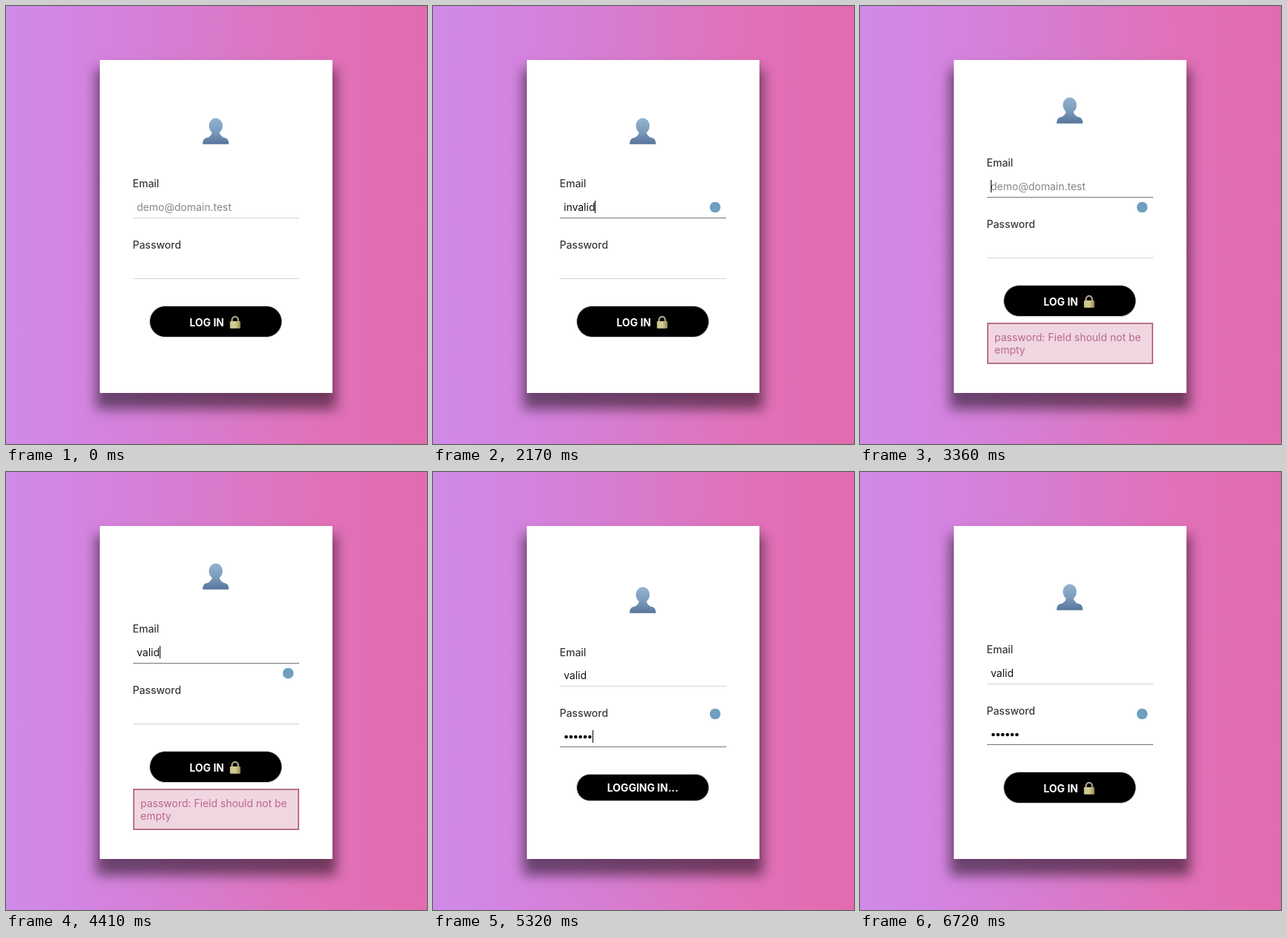
Animation of 570x592 px, one loop 6860 ms. Source, as an HTML page with a canvas:

```html
<!DOCTYPE html>
<html lang="en">
<head>
<meta charset="utf-8">
<title>Login form</title>
<style>
html, body { margin: 0; width: 100%; height: 100%; overflow: hidden; }
canvas { display: block; width: 570px; height: 592px; }
</style>
</head>
<body>
<canvas id="stage"></canvas>
<script>
const W = 570, H = 592, LOOP = 6860;
const FONT = 'Inter, Roboto, sans-serif';
const FOCUS_EMAIL = 980, REJECTED = 3010, FOCUS_PASSWORD = 4480;
const SUBMIT = 5250, DONE = 6230;
const FADE = 280;

// Times of each key press
const FIRST = [1610, 1680, 1780, 1890, 1980, 2080, 2150];
const SECOND = [3680, 3850, 3950, 4060, 4200];
const DOTS = [4620, 4710, 4800, 4890, 4980, 5070];

// Spans in which the caret is visible
const CARET_ON = [
  [FOCUS_EMAIL, 1470], [1610, 2660], [REJECTED, 3500],
  [3680, 5600], [DONE, 6720]
];

const canvas = document.getElementById('stage');
const ctx = canvas.getContext('2d');
const scale = window.devicePixelRatio || 1;
canvas.width = W * scale;
canvas.height = H * scale;

const typed = (times, t) => times.filter(k => k <= t).length;
const clamp01 = v => Math.max(0, Math.min(1, v));
const fade = (t, start) => {
  const p = clamp01((t - start) / FADE);
  return p * p * (3 - 2 * p);
};

function gradient(x0, y0, x1, y1, ...colors) {
  const g = ctx.createLinearGradient(x0, y0, x1, y1);
  colors.forEach((c, i) => g.addColorStop(i / (colors.length - 1), c));
  return g;
}

function text(str, x, y, color, weight = 400, align = 'left') {
  ctx.font = `${weight} 14px ${FONT}`;
  ctx.textAlign = align;
  ctx.fillStyle = color;
  ctx.fillText(str, x, y);
}

function rect(x, y, w, h, color) {
  ctx.fillStyle = color;
  ctx.fillRect(x, y, w, h);
}

function circle(x, y, r, color) {
  ctx.fillStyle = color;
  ctx.beginPath();
  ctx.arc(x, y, r, 0, Math.PI * 2);
  ctx.fill();
}

function background() {
  rect(0, 0, W, H, gradient(0, 0, W, 0, '#d08ae8', '#d482dd', '#d97acb', '#e171b9', '#e36bb0'));
}

function card() {
  // Only the shadow of the far-off rectangle lands on the stage
  ctx.save();
  ctx.shadowColor = 'rgba(0,0,0,0.5)';
  ctx.shadowBlur = 16 * scale;
  ctx.shadowOffsetX = 1000 * scale;
  ctx.shadowOffsetY = 17 * scale;
  rect(122 - 1000, 68, 325, 460, '#000');
  ctx.restore();
  rect(127, 73, 315, 450, '#fff');
}

function avatar(dy) {
  ctx.save();
  ctx.translate(0, dy);
  ctx.fillStyle = gradient(0, 151, 0, 187, '#93b3cf', '#7d9dbe', '#56749a');
  ctx.beginPath();
  ctx.ellipse(284, 162, 9.3, 10.6, 0, 0, Math.PI * 2);
  ctx.fill();
  ctx.fill(new Path2D('M266.3 186.8q0-6.6 4.2-8.2Q278.6 177 279.2 169H288.8Q289.4 177 297.5 178.6q4.2 1.6 4.2 8.2z'));
  ctx.restore();
}

function lock(dy) {
  ctx.save();
  ctx.translate(0, dy);
  ctx.strokeStyle = '#aaa68d';
  ctx.lineWidth = 2.2;
  ctx.stroke(new Path2D('M306 428v-3.5a4.2 4.6 0 0 1 8.4 0V428'));
  ctx.fillStyle = gradient(303, 0, 318, 0, '#cdc58a', '#d3cb95', '#8f8651');
  ctx.beginPath();
  ctx.roundRect(303.2, 426, 14.2, 9.8, 1.2);
  ctx.fill();
  ctx.restore();
}

function button(y, h) {
  ctx.beginPath();
  ctx.roundRect(194.5, y + 0.5, 179, h - 1, (h - 1) / 2);
  ctx.fillStyle = '#000';
  ctx.fill();
  ctx.strokeStyle = '#ccc';
  ctx.lineWidth = 1;
  ctx.stroke();
}

function underline(y, focus) {
  const v = Math.round(212 - 96 * focus);
  rect(172, y, 225, 1, `rgb(${v},${v},${v})`);
}

function alertBox() {
  rect(172, 428, 225, 56, '#b5728a');
  rect(174, 430, 221, 52, '#f0d6e1');
  text('password: Field should not be', 182, 453, '#b9688a');
  text('empty', 182, 470, '#b9688a');
}

function draw(t) {
  ctx.setTransform(scale, 0, 0, scale, 0, 0);
  background();
  card();

  const rejected = t >= REJECTED && t < SUBMIT;
  const busy = t >= SUBMIT && t < DONE;
  const dy = rejected ? -28 : busy ? 3 : 0;
  const topDy = busy ? 4 : dy;
  const inPassword = t >= FOCUS_PASSWORD;

  avatar(topDy);

  const email = t < REJECTED
    ? 'invalid'.slice(0, typed(FIRST, t))
    : 'valid'.slice(0, typed(SECOND, t));
  text('Email', 171.5, 245 + topDy, '#3a3a3a', 500);
  text(email || 'demo@domain.test', 177, 277 + dy, email ? '#111' : '#868686');
  const emailEnd = email ? 177 + ctx.measureText(email).width : 177;
  underline(286 + dy, fade(t, FOCUS_EMAIL) - fade(t, FOCUS_PASSWORD));

  text('Password', 171.5, 328 + dy, '#3a3a3a', 500);
  const dots = typed(DOTS, t);
  for (let i = 0; i < dots; i++) circle(180.4 + 6.4 * i, 355 + dy, 2.3, '#000');
  underline(368 + dy, fade(t, FOCUS_PASSWORD));

  if (CARET_ON.some(([a, b]) => t >= a && t < b)) {
    const x = inPassword ? 177 + 6.45 * dots : emailEnd;
    rect(Math.round(x), (inPassword ? 346 : 263) + dy, 1, 17, '#000');
  }

  if (t >= FOCUS_EMAIL) circle(382, inPassword ? 327 : 272, 7.3, '#6f9fc0');

  if (busy) {
    button(408, 37);
    text('LOGGING IN...', 284, 432, '#fff', 700, 'center');
  } else {
    button(405 + dy, 43);
    text('LOG IN', 248.5, 433 + dy, '#fff', 700);
    lock(dy);
  }

  if (rejected) alertBox();
}

const start = performance.now();
function tick() {
  draw((performance.now() - start) % LOOP);
  requestAnimationFrame(tick);
}
tick();
</script>
</body>
</html>
```
